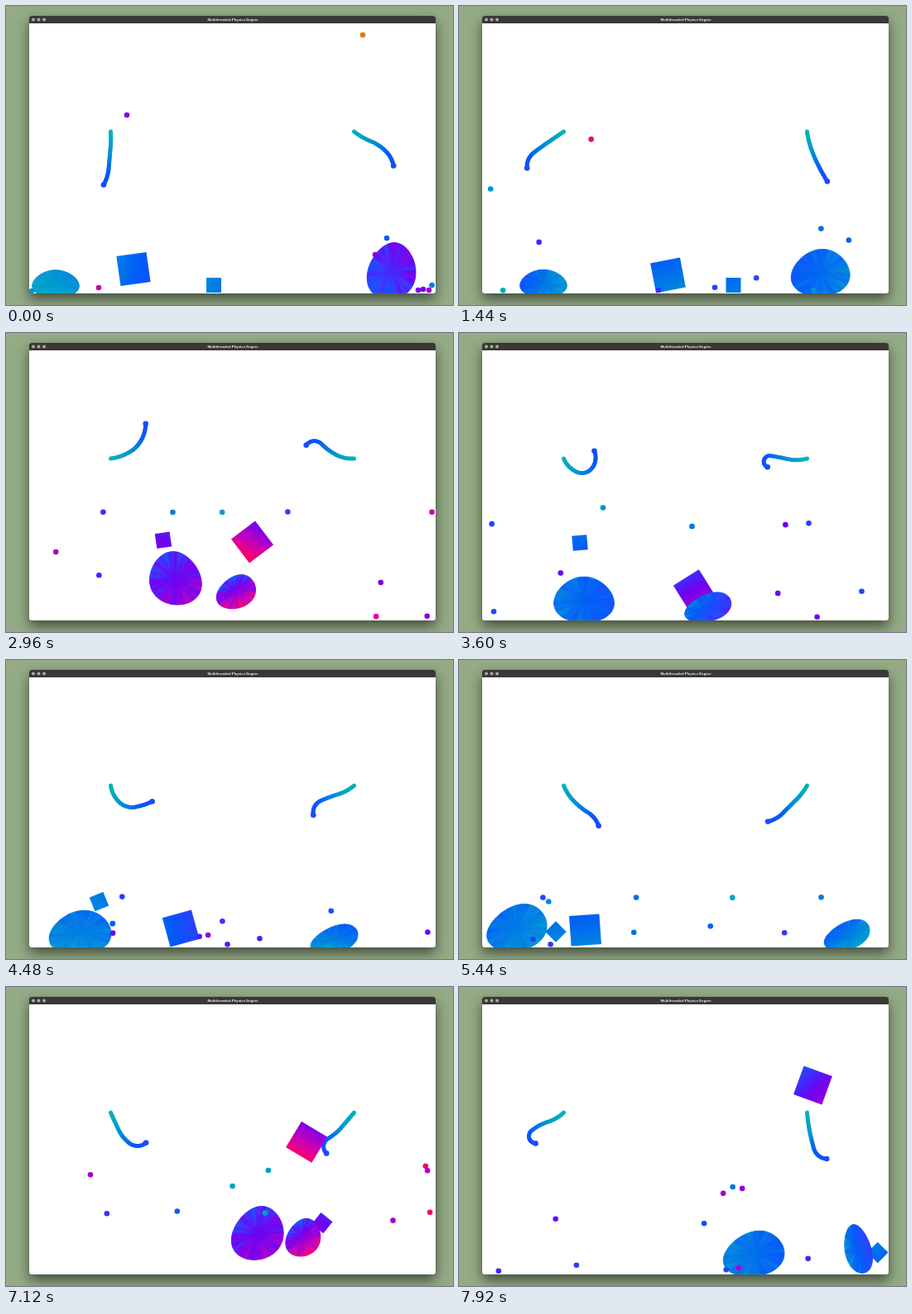
An HTML page with a canvas for the animation above (8 s loop, 540 px wide and 362 px high).

```html
<!DOCTYPE html>
<html lang="en">
<head>
<meta charset="utf-8">
<title>Multithreaded Physics Engine</title>
<style>
  html, body { margin: 0; width: 100%; height: 100%; overflow: hidden; background: #94ab85; }
  .window { position: absolute; left: 28px; top: 12px; width: 491px; height: 336px; border-radius: 3px;
    background: #fff; box-shadow: 0 0 1px rgba(0, 0, 0, .5), 0 7px 15px rgba(0, 0, 0, .55); }
  svg, canvas { position: absolute; left: 0; top: 0; width: 540px; height: 362px; }
</style>
</head>
<body>
<div class="window"></div>
<svg viewBox="0 0 540 362">
  <path d="M28 21V15q0-3 3-3H516q3 0 3 3v6z" fill="#393835"/>
  <g fill="#a9a8a4">
    <circle cx="33" cy="16.6" r="2"/><circle cx="39.5" cy="16.6" r="2"/><circle cx="46" cy="16.6" r="2"/>
  </g>
  <text x="274" y="18.3" text-anchor="middle" font-size="4.3" font-weight="700" fill="#f0eee8"
    font-family="'Liberation Sans', sans-serif">Multithreaded Physics Engine</text>
</svg>
<canvas id="stage"></canvas>
<script>
const LOOP = 8000, STEP = 80;
const LEFT = 28.5, RIGHT = 518.5, TOP = 21, FLOOR = 347.5;
const times = [0, 1440, 2240, 3600, 5440, 6400, 7920];

// Twice per loop everything is drawn to the cursor and flung away.
const pulls = [2240, 6400], cursor = { x: 275, y: 255 };

// Tone ramp: slow teal through blue, magenta and orange to green.
const ramp = [[0, 182, 180], [0, 150, 212], [0, 92, 248], [45, 62, 255], [110, 0, 242], [165, 0, 208],
  [226, 0, 155], [255, 0, 82], [242, 84, 22], [216, 130, 0], [178, 176, 18], [0, 255, 60]];

// Directions along each rope, from anchor to tip, at the key times.
const ropes = [
  { x: 126.5, y: 152, bends: [[88, 95, 95, 120], [145, 146, 142, 82], [-68, -60, -28, -18],
    [66, 25, -55, -115], [67, 46, 32, 72], [20, 0, -32, -58], [138, 162, 142, 0]] },
  { x: 420.5, y: 152, bends: [[38, 22, 44, 80], [82, 70, 63, 58], [172, 200, 234, 246],
    [165, 192, 190, 15], [120, 136, 134, 168], [158, 164, 196, 80], [85, 79, 74, 0]] }
];

// Blob poses: x, y, half width, lean. The height follows from the area.
const blobs = [
  { area: 1000, cool: 900, warm: 2, spread: .22, poses: [[466, 321, 29, 3], [437, 323, 35, 2],
    [288, 272, 26, -4], [151, 323, 36, 0], [71, 324, 35, 8], [242, 285, 28, 4], [357, 323, 36, 6]] },
  { area: 470, cool: 1100, warm: -.5, spread: .4, poses: [[60, 336.5, 28, 0], [102, 336, 28, 0],
    [246, 296, 20, 0], [302, 332, 26, 10], [470, 333, 25, 11], [294, 298, 24, 10], [482, 317, 16, -5]] }
];

// Box poses: x, y, angle.
const boxes = [
  { size: 36.5, cool: 1800, warm: .5, spread: .25, poses: [[154, 318.5, -8], [252.5, 326, -11],
    [291.5, 201, -36], [284, 311.5, -32], [152.5, 327, -4], [296, 249, -45], [427.5, 119, -70]] },
  { size: 18, cool: 900, warm: 0, spread: .1, poses: [[251, 338, 0], [331.5, 338, 0],
    [255.5, 268, -15], [146, 254, -5], [117, 329, -45], [269, 268, -55], [507, 321.5, -45]] }
];

// Loose dots: x, y and tone at the start; the rest is simulated.
const dotStarts = [[431, 35, 9], [146, 132, 4.4], [460, 281, 2], [446, 301, 4.6], [498, 344, 4.2],
  [504, 343, 4.2], [112, 341, 5.5], [31, 345, 1], [511, 344, 4.8], [514.5, 338, 1.5]];

const canvas = document.getElementById('stage');
const ctx = canvas.getContext('2d');
const scale = window.devicePixelRatio || 1;
canvas.width = 540 * scale;
canvas.height = 362 * scale;

const rad = deg => deg * Math.PI / 180;
const clamp = (v, lo, hi) => Math.max(lo, Math.min(hi, v));

// Smooth passage through the rows at the key times.
function sample(rows, t) {
  const last = times.length - 1;
  if (t >= times[last]) return rows[last];
  let i = 0;
  while (t >= times[i + 1]) i++;
  const span = times[i + 1] - times[i], u = (t - times[i]) / span, v = 1 - u;
  const slope = (k, c) => {
    const p = Math.max(0, k - 1), n = Math.min(last, k + 1);
    return (rows[n][c] - rows[p][c]) / (times[n] - times[p]) * span;
  };
  return rows[i].map((a, c) => a * (1 + 2 * u) * v * v + rows[i + 1][c] * u * u * (3 - 2 * u)
    + slope(i, c) * u * v * v - slope(i + 1, c) * u * u * v);
}

function along(list, u) {
  const f = clamp(u, 0, 1) * (list.length - 1);
  const i = Math.min(list.length - 2, Math.floor(f));
  return list[i] + (list[i + 1] - list[i]) * (f - i);
}

function color(tone) {
  const u = tone / (ramp.length - 1);
  return `rgb(${[0, 1, 2].map(c => Math.round(along(ramp.map(p => p[c]), u))).join()})`;
}

function blend(x0, y0, x1, y1, from, to) {
  const g = ctx.createLinearGradient(x0, y0, x1, y1);
  for (let i = 0; i <= 4; i++) g.addColorStop(i / 4, color(from + (to - from) * i / 4));
  return g;
}

// A body heats quickly during a pull and cools at its own pace.
function heat(body, t) {
  const glow = (age, fade) => Math.exp(-((age / fade) ** 2));
  return pulls.reduce((sum, p) => sum + 4.8 * glow(t - p, t < p ? 450 : body.cool),
    1.4 + body.warm * glow(t, 900));
}

// The hot side turns once between the two pulls.
const hotSide = t => rad(120 - 360 * (t - pulls[0]) / (pulls[1] - pulls[0]));

function dot(x, y, r, tone) {
  ctx.fillStyle = color(tone);
  ctx.beginPath();
  ctx.arc(x, y, r, 0, 2 * Math.PI);
  ctx.fill();
}

function drawRope(rope, t) {
  const bends = sample(rope.bends, t);
  const beads = 40, link = 65.6 / beads;
  let { x, y } = rope;
  for (let i = 0; i <= beads; i++) {
    const u = i / beads, a = rad(along(bends, u));
    dot(x, y, i === beads ? 3.3 : 2.5, 2.6 * u);
    x += link * Math.cos(a);
    y += link * Math.sin(a);
  }
}

function drawBlob(blob, t) {
  const [x, y, rx, lean] = sample(blob.poses, t);
  const ry = blob.area / rx, warmth = heat(blob, t), n = 96;
  const point = a => {
    const c = Math.cos(a), s = Math.sin(a);
    return [clamp(x + rx * c * (1 + .15 * s) - lean * s, LEFT, RIGHT), Math.min(FLOOR, y + ry * s)];
  };
  ctx.lineWidth = .8;
  for (let i = 0; i < n; i++) {
    const a = 2 * Math.PI * i / n;
    const p = point(a), q = point(a + 2 * Math.PI / n);
    const streak = .1 * (Math.sin(7 * a) + Math.sin(17 * a + 1));
    const tone = warmth * (1 + blob.spread * Math.cos(a - hotSide(t)) + streak);
    ctx.fillStyle = ctx.strokeStyle = blend(x, y, p[0], p[1], warmth, tone);
    ctx.beginPath();
    ctx.moveTo(x, y);
    ctx.lineTo(...p);
    ctx.lineTo(...q);
    ctx.closePath();
    ctx.fill();
    ctx.stroke();
  }
}

function drawBox(box, t) {
  const [x, y, angle] = sample(box.poses, t);
  const half = box.size / 2, a = rad(angle);
  const reach = half * (Math.abs(Math.cos(a)) + Math.abs(Math.sin(a)));
  const px = clamp(x, LEFT + reach, RIGHT - reach), py = Math.min(y, FLOOR - reach);
  const warmth = heat(box, t), dir = hotSide(t) + rad(60);
  const dx = half * 1.2 * Math.cos(dir), dy = half * 1.2 * Math.sin(dir);
  ctx.fillStyle = blend(px - dx, py - dy, px + dx, py + dy,
    warmth * (1 - box.spread), warmth * (1 + box.spread));
  ctx.beginPath();
  for (let i = 0; i < 4; i++) {
    const c = a + Math.PI * (i / 2 + .25), r = half * Math.SQRT2;
    ctx.lineTo(px + r * Math.cos(c), py + r * Math.sin(c));
  }
  ctx.fill();
}

// Gravity, bouncing walls and a spring to the cursor during each pull.
function simulateDots() {
  const r = 3.3, perTone = 48, sub = 10, dt = STEP / 1000 / sub, bounce = .75;
  const dots = dotStarts.map(([x, y, tone], i) => ({
    x, y, vx: tone * perTone * Math.cos(2.4 * i), vy: tone * perTone * Math.sin(2.4 * i)
  }));
  const move = (d, t) => {
    const pulled = pulls.some(p => t > p - 800 && t < p + 160);
    const spring = pulled ? 7 : 0, drag = pulled ? .9 : .15;
    d.vx += dt * (spring * (cursor.x - d.x) - drag * d.vx);
    d.vy += dt * (spring * (cursor.y - d.y) - drag * d.vy + 130);
    d.x += dt * d.vx;
    d.y += dt * d.vy;
    if (d.x < LEFT + r || d.x > RIGHT - r) d.vx *= -bounce;
    if (d.y < TOP + r || d.y > FLOOR - r) d.vy *= -bounce;
    d.x = clamp(d.x, LEFT + r, RIGHT - r);
    d.y = clamp(d.y, TOP + r, FLOOR - r);
  };
  const frames = [];
  for (let t = 0; t < LOOP; t += STEP) {
    frames.push(dots.map(d => [d.x, d.y, r, Math.hypot(d.vx, d.vy) / perTone]));
    for (let k = 0; k < sub; k++) dots.forEach(d => move(d, t));
  }
  return frames;
}
const dotFrames = simulateDots();

function draw(t) {
  ctx.setTransform(scale, 0, 0, scale, 0, 0);
  ctx.clearRect(0, 0, 540, 362);
  ropes.forEach(r => drawRope(r, t));
  boxes.forEach(b => drawBox(b, t));
  blobs.forEach(b => drawBlob(b, t));
  dotFrames[t / STEP].forEach(d => dot(...d));
}

const start = performance.now();
function tick() {
  const t = Math.max(0, performance.now() - start) % LOOP;
  draw(Math.floor(t / STEP) * STEP);
  requestAnimationFrame(tick);
}
tick();
</script>
</body>
</html>
```
